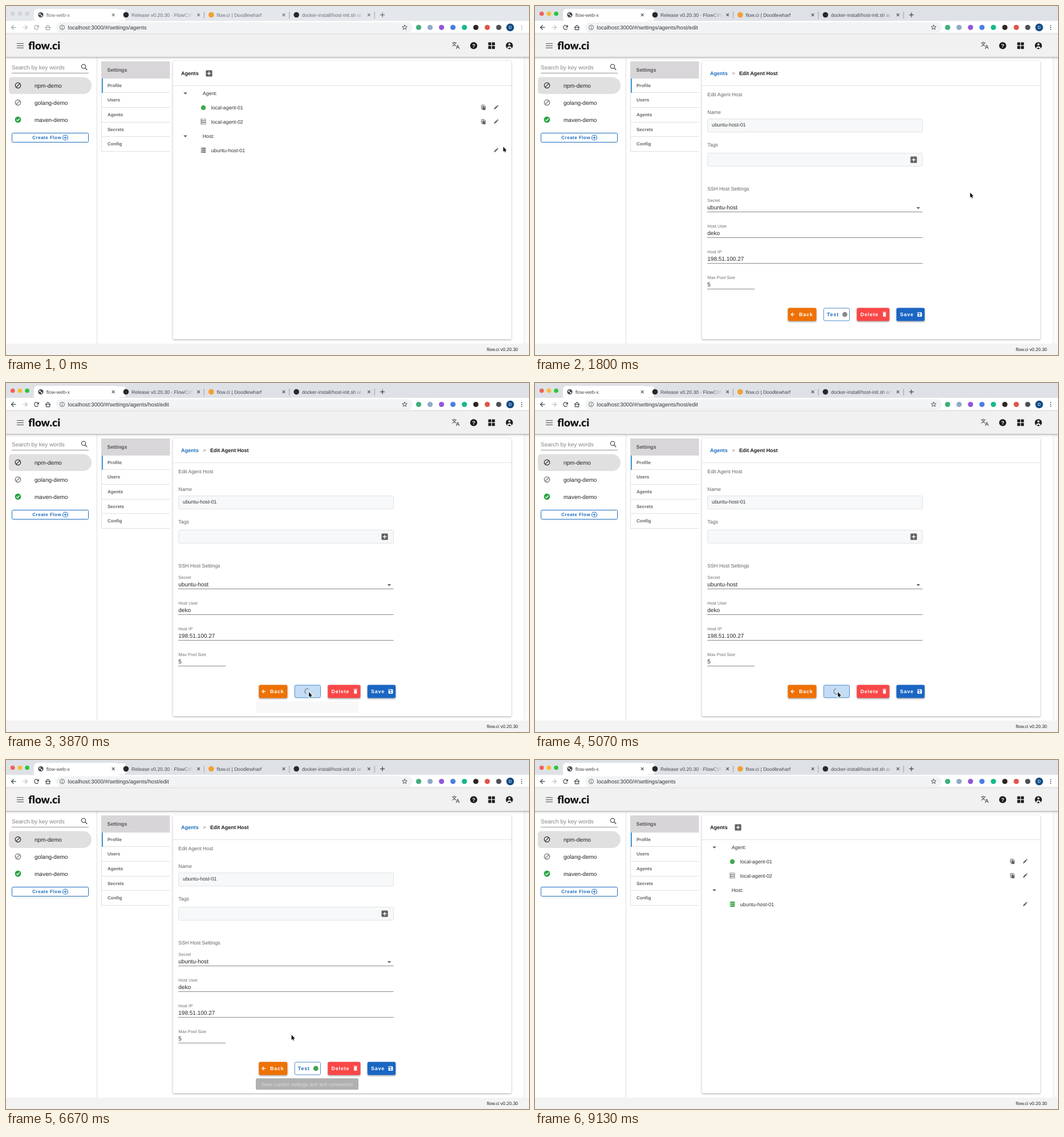
Write an HTML page with a canvas that moves like this. It is 917 px wide and 611 px high and loops after 9190 ms.

```html
<!DOCTYPE html>
<html lang="en">
<head>
<meta charset="utf-8">
<title>Agent host settings</title>
<style>
html, body { margin: 0; width: 100%; height: 100%; overflow: hidden; background: #fff; }
canvas { display: block; width: 917px; height: 611px; }
</style>
</head>
<body>
<canvas id="stage"></canvas>
<script>
const W = 917, H = 611, LOOP = 9190, TAU = Math.PI * 2;
const SANS = '"Liberation Sans", Arial, sans-serif';
const BLUE = '#1b6cbd', GREEN = '#35a245', GREY = '#646464', INK = '#333', BLACK = '#1c1c1c';
const SMALL = 7.63, NAV = 8.03, TAB = 8.6, BODY = 8.85, TITLE = 9.05, LARGE = 10;

// Key moments
const ACTIVE = 450, PRESS = 830, OPEN = 1100, TEST = 3700, TESTED = 5300, CLOSE = 7590;

const canvas = document.getElementById('stage');
const ratio = window.devicePixelRatio || 1;
canvas.width = W * ratio;
canvas.height = H * ratio;
const c = canvas.getContext('2d');
c.textRendering = 'geometricPrecision';

const clamp = v => Math.max(0, Math.min(1, v));
const between = (t, from, to) => t > from && t < to;

// Drawing helpers
function rect(x, y, w, h, color) {
  c.fillStyle = color;
  c.fillRect(x, y, w, h);
}
function paint(fill, stroke, line = 1) {
  if (fill) { c.fillStyle = fill; c.fill(); }
  if (stroke) { c.strokeStyle = stroke; c.lineWidth = line; c.stroke(); }
}
function box(x, y, w, h, r, fill, stroke, line) {
  c.beginPath();
  c.roundRect(x, y, w, h, r);
  paint(fill, stroke, line);
}
function square(x, y, half, color, r = 0) {
  box(x - half, y - half, half * 2, half * 2, r, color);
}
function arc(x, y, r, from, to, color, line = 1.2) {
  c.beginPath();
  c.arc(x, y, r, from, to);
  paint(null, color, line);
}
function disc(x, y, r, fill, stroke, line) {
  c.beginPath();
  c.arc(x, y, r, 0, TAU);
  paint(fill, stroke, line);
}
function trace(points) {
  c.beginPath();
  for (let i = 0; i < points.length; i += 2) c.lineTo(points[i], points[i + 1]);
}
function path(color, line, ...points) {
  trace(points);
  paint(null, color, line);
}
function poly(color, ...points) {
  trace(points);
  paint(color);
}
function at(x, y, draw, angle = 0) {
  c.save();
  c.translate(x, y);
  c.rotate(angle);
  draw();
  c.restore();
}
function shadowed(blur, dy, alpha, draw) {
  c.save();
  c.shadowColor = `rgba(0,0,0,${alpha})`;
  c.shadowBlur = blur * ratio;
  c.shadowOffsetY = dy * ratio;
  draw();
  c.restore();
}
function font(size, weight = 400, gap = 0, family = SANS) {
  c.font = `${weight} ${size}px ${family}`;
  c.letterSpacing = gap + 'px';
}
// y is the middle of the capitals
function text(s, x, y, size, color = INK, ...style) {
  font(size, ...style);
  c.fillStyle = color;
  c.fillText(s, x, y + size * 0.36);
}

// Icons
const plus = (x, y, s, color, line = 1.2) => {
  path(color, line, x - s, y, x + s, y);
  path(color, line, x, y - s, x, y + s);
};
const cross = (x, y, color) => at(x, y, () => plus(0, 0, 3.3, color, 1.1), Math.PI / 4);
const plusBox = (x, y) => {
  square(x, y, 5.6, '#606060', 1.4);
  plus(x, y, 3.2, '#fff', 1.4);
};
const pencil = (x, y) => at(x, y, () => {
  rect(-1.2, -4.9, 2.4, 1.6, '#5d5d5d');
  rect(-1.2, -2.6, 2.4, 5.8, '#5d5d5d');
  poly('#5d5d5d', -1.2, 3.2, 1.2, 3.2, 0, 5);
}, Math.PI / 4);
const copy = (x, y) => {
  box(x - 3.4, y - 4, 5.4, 7, 0.6, null, '#5d5d5d');
  box(x - 2, y - 2.6, 6, 7.4, 0.8, '#5d5d5d', '#fff', 0.6);
  rect(x + 1, y - 1.8, 1, 2.2, '#fff');
};
const caret = (x, y) => poly('#555', x - 3.3, y - 1.5, x + 3.3, y - 1.5, x, y + 1.8);
const blocked = (x, y, color) => {
  disc(x, y, 4.7, null, color, 1.2);
  path(color, 1.2, x - 3.2, y + 3.2, x + 3.2, y - 3.2);
};
const arrow = (x, y, color, dir, s) => {
  path(color, 1.3, x + dir * s, y, x - dir * s, y);
  path(color, 1.3, x, y - s, x - dir * s, y, x, y + s);
};
const star = (x, y, color) => {
  c.beginPath();
  for (let i = 0; i < 10; i++) {
    const r = i % 2 ? 1.9 : 4.5, a = (i * TAU) / 10 - TAU / 4;
    c.lineTo(x + r * Math.cos(a), y + r * Math.sin(a));
  }
  c.closePath();
  paint(null, color);
};
const trash = (x, y) => {
  rect(x - 2.5, y - 2.8, 5, 6.7, '#fff');
  rect(x - 3.2, y - 4.4, 6.4, 1, '#fff');
};
const floppy = (x, y) => {
  box(x - 3.9, y - 3.9, 7.8, 7.8, [1, 2, 1, 1], '#fff');
  rect(x - 2.8, y - 2.9, 4.2, 1.8, BLUE);
  disc(x, y + 1.4, 1.3, BLUE);
};
const globe = (x, y) => {
  disc(x, y, 4.6, '#44484c');
  disc(x - 1.4, y - 1.2, 1.4, '#fff');
  disc(x + 1.4, y + 1.6, 1.3, '#fff');
};

function tabStrip(active) {
  const strip = active ? '#dee1e6' : '#e4e7eb';
  const ink = active ? '#45494d' : '#6b6e72';
  const y = 15.5, step = 149.4;
  rect(0, 0, W, 27, strip);
  ['#f55f57', '#f6bc2f', '#2ac53f'].forEach((color, i) =>
    disc(11.7 + i * 12.7, 13.5, 3.8, active ? color : '#d3d4d7'));
  box(49, 5, step, 24, 6, '#fff');
  const icons = [globe, '#25292e', '#f3a035', '#25292e'];
  const titles = ['flow-web-x', 'Release v0.20.30 · FlowCI/flow-docker', 'flow.ci | Doodlewharf', 'docker-install/host-init.sh at master'];
  titles.forEach((title, i) => {
    const x = 61 + i * step;
    if (i === 0) globe(x, y); else disc(x, y, 4.8, icons[i]);
    const fade = c.createLinearGradient(x + 100, 0, x + 118, 0);
    fade.addColorStop(0, ink);
    fade.addColorStop(1, ink + '00');
    text(title, x + 9.7, y, TAB, fade);
    rect(x + 118, 6, 30, 19, i ? strip : '#fff');
    cross(x + 127.2, y, ink);
    if (i) rect(x + 136.5, 10, 1, 12, '#9a9da1');
  });
  plus(660, y, 4, ink, 1.3);
}

function toolbar(active, url) {
  const y = 37.5, ink = active ? '#484c50' : '#a7a9ac';
  rect(0, 26, W, 23, '#fff');
  arrow(13.5, y, ink, 1, 4);
  arrow(33.5, y, '#c0c2c4', -1, 4);
  arc(53.5, y, 3.7, 0.5, 5.5, ink);
  poly(ink, 57.8, 33, 57.8, y, 53.5, y);
  path(ink, 1.2, 69, 38, 73.5, 33.6, 78, 38);
  box(70.4, y, 6.2, 4.2, 0, null, ink, 1.2);
  box(88, 28.5, 625, 18, 9, '#f1f3f4');
  disc(98.5, y, 4, null, '#5f6368');
  path('#5f6368', 1, 98.5, 37, 98.5, 40);
  disc(98.5, 35.6, 0.6, '#5f6368');
  text(url, 108.5, y, 9.66, '#34373a');
  star(699, y, '#55595d');

  const marks = ['#3faf7c', '#8fa9c8', '#9256dc', '#4a7fe0', '#16b98a', '#302521', '#df5548', '#4d5155'];
  marks.forEach((color, i) => disc(723.5 + i * 20.06, y, 4.6, color));
  disc(884, y, 6.8, '#114b86');
  text('D', 881.3, y, 7.5, '#fff');
  for (let i = -1; i < 2; i++) disc(904.2, y + i * 3.4, 0.95, ink);
}

function appBar() {
  const y = 69.4, bar = '#f2f1f2';
  shadowed(4, 1, 0.4, () => rect(-9, 49, W + 18, 40, bar));
  rect(0, 48.5, W, 0.8, '#dcdcdd');
  for (let i = -1; i < 2; i++) rect(19, 69 + i * 3.8, 12, 1.1, '#555');
  text('flow.ci', 39, y, 18.8, '#111', 900, 0, 'Lato, "Open Sans", sans-serif');
  text('文', 781.5, y - 2.4, 9, BLACK, 500, 0, '"Noto Sans CJK SC", "Noto Sans CJK", sans-serif');
  text('A', 789, y + 2.6, 9.5, BLACK);
  disc(820, y, 6.2, BLACK);
  text('?', 817.2, y, 9.2, '#fff', 700);
  for (const dx of [-3.2, 3.2]) for (const dy of [-3.2, 3.2]) square(851.4 + dx, y + dy, 2.6, BLACK);
  disc(882.6, y, 6.2, BLACK);
  disc(882.6, y - 2.2, 1.9, bar);
  arc(882.6, y + 5, 2.8, Math.PI, TAU, bar, 2.2);
}

function sidebar() {
  text('Search by key words', 10, 107, LARGE, '#858585');
  disc(136, 105.8, 3.6, null, '#555', 1.3);
  path('#555', 1.6, 138.7, 108.5, 142.2, 112);
  rect(10, 117, 135, 1, '#949494');
  box(5, 124.5, 145, 29.5, [5, 15, 15, 5], '#e1e0e1');
  ['npm-demo', 'golang-demo', 'maven-demo'].forEach((name, i) => {
    const y = 139 + i * 30;
    text(name, 50, y, LARGE, '#222');
    if (i < 2) return blocked(21, y, i ? '#666' : '#222');
    disc(21, y, 5.4, '#27a243');
    path('#fff', 1.3, 18.4, y, 20.3, y + 2, 23.8, y - 2);
  });
  box(10.5, 222.5, 134, 16, 2, null, BLUE);
  text('Create Flow', 46.3, 230.5, 8, BLUE, 700, 0.5);
  disc(104, 230.5, 4.5, null, BLUE, 1.1);
  plus(104, 230.5, 2.5, BLUE, 1.1);
  rect(159, 90, 1, 501, '#e0e0e0');

  rect(167, 97, 120.5, 30, '#d8d6d8');
  text('Settings', 177.5, 112, BODY, '#555', 700);
  rect(167, 127, 1, 128, '#dedede');
  ['Profile', 'Users', 'Agents', 'Secrets', 'Config'].forEach((name, i) => {
    const y = 139 + i * 25.6;
    text(name, 178, y, NAV, GREY, 700);
    rect(168, Math.round(y + 12.4), 119.5, 1, '#dfdfdf');
  });
  rect(168, 127, 2, 25, '#3f98dc');
}

function serverIcon(x, y, color, solid) {
  for (let i = -1; i < 2; i++) {
    const top = y - 1.3 + i * 3.3;
    box(x - 4.2, top, 8.4, 2.5, 0, solid && color, solid ? null : color, 0.8);
    rect(x - 3.2, top + 0.9, 1.2, 0.8, solid ? '#fff' : color);
  }
}

function listPage(t) {
  const row = i => 152.5 + i * 25;
  if (between(t, 600, OPEN)) rect(302.5, row(4) - 12.5, 573, 25, '#f2f1f2');
  if (between(t, PRESS, OPEN)) disc(859.3, row(4), 11.2 * clamp((t - PRESS) / 150), '#aaa9aa');
  text('Agents', 307, 118, TITLE, BLACK, 700);
  plusBox(356, 118);
  ['Agent:', 'local-agent-01', 'local-agent-02', 'Host:', 'ubuntu-host-01'].forEach((label, i) => {
    const y = row(i), group = label.endsWith(':');
    text(label, group ? 344.7 : 359.7, y, BODY);
    if (group) return caret(314.5, y + 0.5);
    pencil(859.2, y);
    if (i < 3) copy(837, y);
  });
  disc(346, row(1) + 0.5, 4.2, '#43a94b');
  serverIcon(346, row(2), '#777', false);
  serverIcon(346, row(4), t > TESTED ? GREEN : '#7d7d7d', true);
}

function inputBox(label, y) {
  text(label, 302.3, y, BODY, GREY);
  box(302.5, y + 12, 377, 23, 2, '#f7f8f9', '#dfe3e5');
}

// Buttons grow with their labels
function buttonRow(t) {
  const y = 540, gap = 12.3, pad = 25.2;
  const loading = between(t, TEST, TESTED), hover = between(t, 3050, 6550);
  const test = loading ? '#c5dcf5' : hover ? '#eef5fc' : '#fff';
  const dot = (x, y) => disc(x, y, 4.4, t < TESTED ? '#898989' : '#3fa548');
  const back = (x, y) => arrow(x, y, '#fff', 1, 3);
  const buttons = [['Back', '#ee7104', back], ['Test', test, dot], ['Delete', '#fa4747', trash], ['Save', '#1a66c3', floppy]];
  let x = 443.4;
  for (const [label, fill, icon] of buttons) {
    font(BODY, 700, 0.9);
    const w = c.measureText(label).width + pad;
    const outlined = icon === dot, first = icon === back;
    if (outlined) box(x + 0.5, y - 11, w - 1, 22, 2.5, fill, '#4c8bc9');
    else shadowed(3, 1.5, 0.35, () => box(x, y - 11.5, w, 23, 2.8, fill));
    if (outlined && loading) {
      spinner(x + w / 2, y, t - TEST);
    } else {
      text(label, x + (first ? 19.5 : 6.2), y, BODY, outlined ? BLUE : '#fff', 700, 0.9);
      icon(first ? x + 8.7 : x + w - 8.7, y);
    }
    x += w + gap;
  }
}
function spinner(x, y, t) {
  const a = (t / 1400) * TAU;
  arc(x, y, 4.8, 1.3 + a, 3.3 + a * 2 % TAU * 0 + a + 1.4 * Math.cos(a), '#73808c');
}
function tooltip(t) {
  const shown = t < TEST ? (t - 3200) / 150
    : t < TESTED ? 1 - (t - TEST) / 175
    : Math.min((t - TESTED) / 150, 1 - (t - 6600) / 150);
  c.save();
  c.globalAlpha = clamp(shown);
  box(438, 557.3, 180, 20, 2.6, '#717171');
  text('Save current settings and test connection', 447.5, 567.4, 8.75, '#fff');
  c.restore();
}

function formPage(t) {
  text('Agents', 307, 118, TITLE, BLUE, 700);
  text('>', 345.3, 118, TITLE, '#777');
  text('Edit Agent Host', 358, 118, TITLE, BLACK, 700);
  text('Edit Agent Host', 302.3, 154.5, BODY, GREY);
  inputBox('Name', 185.7);
  text('ubuntu-host-01', 310, 207.5, BODY);
  inputBox('Tags', 242.5 + 3);
  rect(302, 238, 30, 14, '#fff');
  text('Tags', 302.3, 242.5, BODY, GREY);
  plusBox(664, 269.2);
  text('SSH Host Settings', 302.3, 319.5, BODY, GREY);
  const fields = { 'Secret': 'ubuntu-host', 'Host User': 'deko', 'Host IP': '198.51.100.27', 'Max Pool Size': '5' };
  Object.entries(fields).forEach(([label, value], i) => {
    const y = 340.5 + i * 45;
    const dark = label === 'Host IP' && between(t, 2300, 2750);
    text(label, 302.3, y, SMALL, '#707070');
    text(value, 302.3, y + 11.7, LARGE, '#272727');
    rect(302, y + 19.5, value === '5' ? 83 : 377.5, 1, dark ? '#555' : '#8b8b8b');
  });
  caret(672, 353.7);
  buttonRow(t);
  tooltip(t);
}

// Each move: when it starts and where it goes; longer ways take longer
const MOVES = [[350, 859.5, 254.3], [1500, 514.5, 513], [2750, 531, 541], [6450, 315.3, 118], [7750, 400, 225], [8450, 560, -20]];
function pointer(t) {
  let x = 871.8, y = 246.5;
  for (const [start, toX, toY] of MOVES) {
    const p = clamp((t - start) / (300 + 1.3 * Math.hypot(toX - x, toY - y)));
    const e = p * p * (3 - 2 * p);
    x += (toX - x) * e;
    y += (toY - y) * e;
    if (p < 1) break;
  }
  return [x, y];
}
function beam() {
  path('#222', 1, 0, -4.5, 0, 4.5);
  for (const y of [-4.5, 4.5]) path('#222', 1, -2, y, 2, y);
}
function hand() {
  box(-3.4, 4.4, 8, 6, 2, '#fff', '#111');
  for (let i = 0; i < 3; i++) box(-1 + i * 1.9, i ? 3.2 : 0, 1.9, 5, 1, '#fff', '#111', 0.9);
  box(-2, 5.2, 6, 4, 1, '#fff');
}
function arrowhead() {
  const shape = [0, 0, 0, 8.6, 1.9, 6.9, 3.2, 9.8, 4.6, 9.2, 3.4, 6.4, 6, 6.2, 0, 0];
  path('#fff', 1.6, ...shape);
  poly('#111', ...shape);
}
function cursor(t) {
  const overTest = between(t, 3050, TEST) || between(t, TESTED, 6550);
  const shape = between(t, 7300, 7620) ? beam : overTest ? hand : arrowhead;
  at(...pointer(t), shape);
}

function draw(t) {
  const active = t > ACTIVE;
  const address = 'localhost:3000/#/settings/agents';
  c.setTransform(ratio, 0, 0, ratio, 0, 0);
  rect(0, 0, W, H, '#fff');
  tabStrip(active);
  toolbar(active, address + (between(t, 960, 7500) ? '/host/edit' : ''));
  rect(908, 49, 9, 562, '#fafafa');
  rect(908, 49, 1, 562, '#e7e7e7');
  sidebar();
  shadowed(3, 1, 0.35, () => box(292.5, 96.5, 593.5, 487, 2, '#fff'));
  rect(292.5, 139, 593.5, 1, '#e2e2e2');
  appBar();
  if (between(t, OPEN, CLOSE)) formPage(t); else listPage(t);
  rect(0, 591, W, 20, '#f4f3f4');
  text('flow.ci v0.20.30', 843, 601, NAV, '#222');
  if (between(t, 7320, 7720)) {
    shadowed(2, 0, 0.3, () => box(-1, 597.5, 127, 15, 3, '#dee1e6', '#b9bbbf', 0.8));
    text(address, 3, 604.7, 8.26, '#3c4043');
  }
  cursor(t);
}

// Time advances in steps of a fifteenth of a second
const start = performance.now();
function tick() {
  const t = (performance.now() - start) % LOOP;
  draw(Math.floor((t + 5) * 0.015) / 0.015);
  requestAnimationFrame(tick);
}
tick();
</script>
</body>
</html>
```
